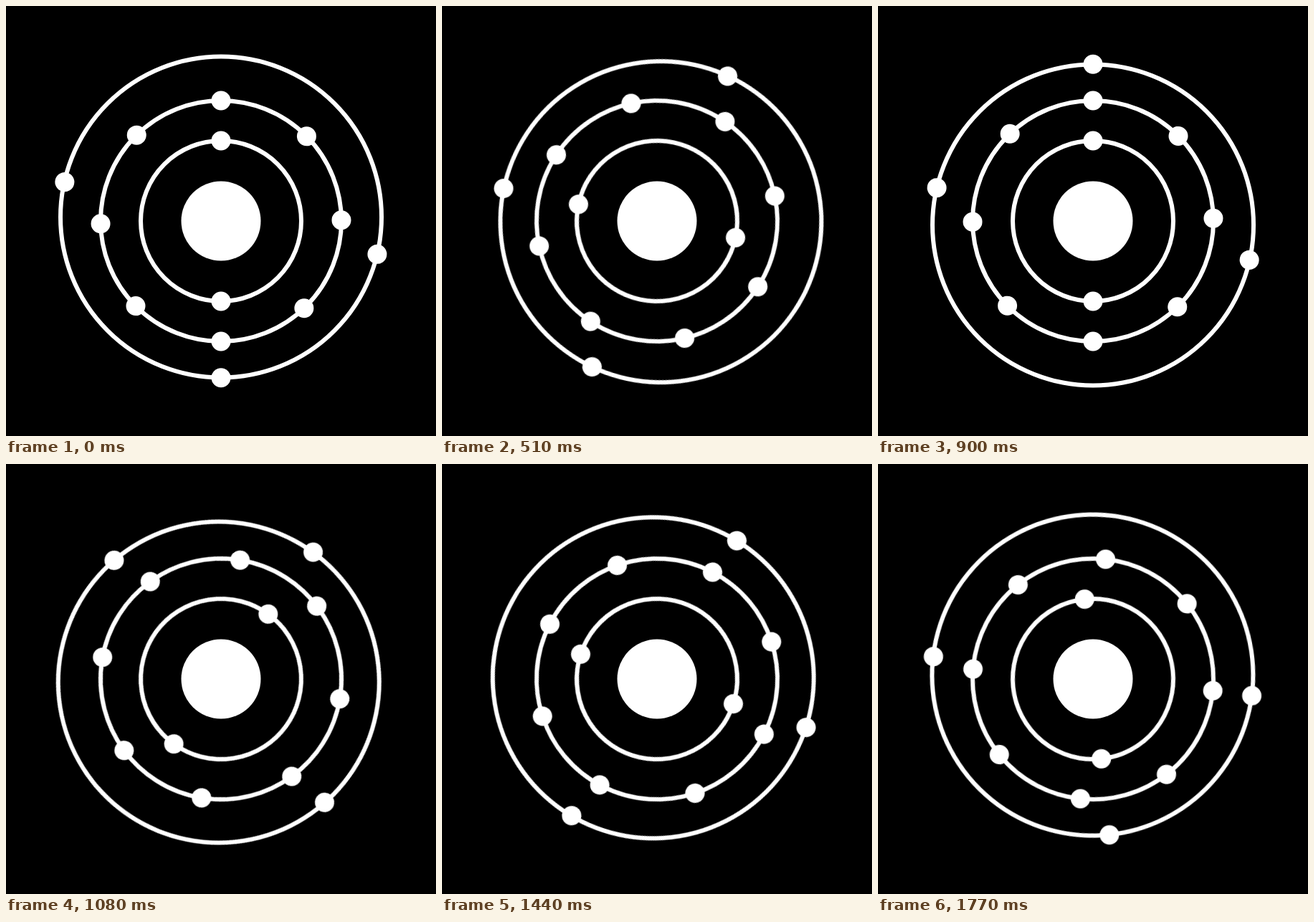
These frames come from a looping animation (600x600 px, 1.8 s). An HTML page:

```html
<!DOCTYPE html>
<html lang="en">
<head>
<meta charset="utf-8">
<title>Atom</title>
<style>
  html, body { margin: 0; width: 100%; height: 100%; overflow: hidden; background: #000; }
  svg { display: block; width: 100%; height: 100%; }
  circle { fill: #fff; }
  .ring { fill: none; stroke: #fff; stroke-width: 6; }
  .shell { transform-origin: 0 0; animation: spin 1800ms steps(60, end) infinite; }
  .back { animation-direction: normal; animation-name: spin-back; }
  @keyframes spin { from { transform: rotate(0deg); } to { transform: rotate(360deg); } }
  @keyframes spin-back { from { transform: rotate(0deg); } to { transform: rotate(-360deg); } }
</style>
</head>
<body>
<svg viewBox="-300 -300 600 600">
  <circle r="55.5"/>

  <g class="shell">
    <circle class="ring" r="112"/>
    <circle r="13.5" cy="-112"/>
    <circle r="13.5" cy="112"/>
  </g>

  <g class="shell back">
    <circle class="ring" r="168"/>
    <circle r="13.5" cy="-168"/>
    <circle r="13.5" cy="-168" transform="rotate(45.3)"/>
    <circle r="13.5" cy="-168" transform="rotate(89.6)"/>
    <circle r="13.5" cy="-168" transform="rotate(136.4)"/>
    <circle r="13.5" cy="-168" transform="rotate(180)"/>
    <circle r="13.5" cy="-168" transform="rotate(225.1)"/>
    <circle r="13.5" cy="-168" transform="rotate(268.7)"/>
    <circle r="13.5" cy="-168" transform="rotate(315.5)"/>
  </g>

  <!-- The outer ring sits off centre, so it wobbles as it turns. -->
  <g class="shell">
    <circle class="ring" r="224" cy="-5.5"/>
    <circle r="13.5" cy="-222.8" transform="rotate(102)"/>
    <circle r="13.5" cy="-218.8" transform="rotate(180)"/>
    <circle r="13.5" cy="-224.8" transform="rotate(284)"/>
  </g>
</svg>
</body>
</html>
```
